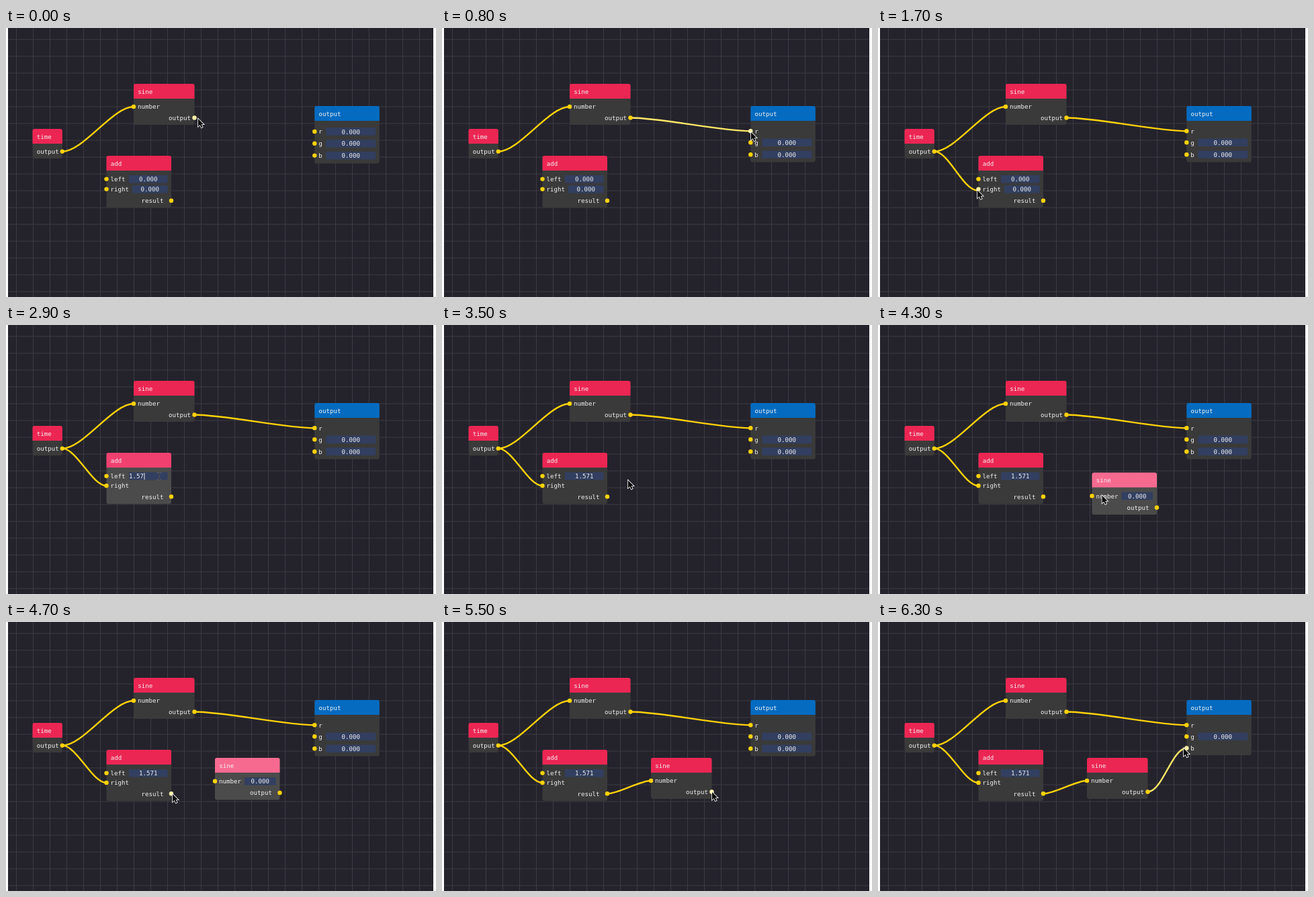
Animation, 640 px wide and 400 px high, one loop 6400 ms. Source, as an HTML page with a canvas:

```html
<!DOCTYPE html>
<html lang="en">
<head>
<meta charset="utf-8">
<title>Node editor</title>
<style>
html, body { margin: 0; width: 100%; height: 100%; overflow: hidden; background: #fff; }
canvas { display: block; width: 640px; height: 400px; }
</style>
</head>
<body>
<canvas id="stage" width="640" height="400"></canvas>
<script>
const ctx = document.getElementById('stage').getContext('2d');
const LOOP = 6400, STEP = 100;
const FONT = '9.15px "DejaVu Sans Mono", monospace';
const CHAR = 5.5, TITLE_H = 22, REACH = 8;
const RED = ['#ec2653', '#f04070', '#f76a90'];
const BLUE = ['#046bc0', '#2d7ec2', '#5194cc'];
const YELLOW = '#ffd20a';
const MENU = ['output', 'time', 'sine', 'multiply', 'add'];

// Mouse path: step, x, y
const PATH = [
  [0, 286, 135], [1, 289, 136], [6, 458, 154], [8, 460, 155], [12, 84, 186],
  [14, 128, 226], [16, 148, 241], [18, 148, 242], [22, 228, 225], [33, 228, 225],
  [37, 326, 237], [38, 326, 237], [40, 341, 271], [42, 341, 271], [44, 326, 236],
  [47, 248, 256], [48, 250, 256], [51, 310, 237], [52, 311, 238], [55, 402, 253],
  [56, 404, 251], [62, 455, 188], [64, 455, 188]
];

// Link: from node, pin, to node, pin, step grabbed, step dropped
const LINKS = [
  ['time', 'output', 'sine', 'number', -2, -1],
  ['sine', 'output', 'out', 'r', 1, 7],
  ['time', 'output', 'add', 'right', 13, 18],
  ['add', 'result', 'sine2', 'number', 48, 52],
  ['sine2', 'output', 'out', 'b', 56, 63]
];

function mouseAt(n) {
  let i = 0;
  while (i < PATH.length - 2 && PATH[i + 1][0] <= n) i++;
  const [a, ax, ay] = PATH[i], [b, bx, by] = PATH[i + 1];
  const u = (n - a) / (b - a), e = u * u * (3 - 2 * u);
  return { x: ax + (bx - ax) * e, y: ay + (by - ay) * e };
}

const input = (name, y, field, value = '0.000') => ({ name, y, x: 6, field, value });
const output = (name, y, x) => ({ name, y, x, out: true });

function sineNode(x, y, linked) {
  return {
    x, y, title: 'sine', colors: RED, w: linked ? 90.5 : 96.5, h: linked ? 61 : 62.5,
    rows: [input('number', linked ? 34 : 34.8, !linked && [44, 90.5]),
           output('output', linked ? 50.5 : 52, 52)]
  };
}

function buildNodes(n) {
  const r = n >= 7, b = n >= 63, right = n >= 18;
  const nodes = {
    time: { x: 39.5, y: 150, w: 44.3, h: 44, title: 'time', colors: RED, rows: [output('output', 33.6, 6.3)] },
    sine: sineNode(190, 83, true),
    add: {
      x: 149.5, y: 190, w: 96.5, h: right ? 76 : 77.3, title: 'add', colors: RED,
      rows: [input('left', 34.6, [33.5, 91], n >= 33 ? '1.571' : '0.000'),
             input('right', right ? 49 : 49.6, !right && [38.5, 91]),
             output('result', right ? 65.3 : 66.8, 52)]
    },
    out: {
      x: 459.3, y: 116, w: 96.5, h: 85.5 - (r ? 2 : 0) - (b ? 1.5 : 0), title: 'output', colors: BLUE,
      rows: [input('r', r ? 37.2 : 38, !r && [17, 91]),
             input('g', r ? 54.2 : 55.8, [17, 91]),
             input('b', r ? (b ? 71.5 : 72.2) : 73.6, !b && [17, 91])]
    }
  };
  if (n >= 42) {
    const m = mouseAt(Math.min(n, 44));
    nodes.sine2 = sineNode(m.x - 15, m.y - 34, n >= 52);
    nodes.sine2.selected = n < 48;
  }
  for (const node of Object.values(nodes))
    for (const row of node.rows)
      row.pin = { x: node.x + (row.out ? node.w : 0), y: node.y + row.y };
  return nodes;
}

const dist = (a, b) => Math.hypot(a.x - b.x, a.y - b.y);
const pinOf = (nodes, id, name) => nodes[id].rows.find(row => row.name === name).pin;

function curve(a, b) {
  const k = dist(a, b) / 4;
  return [a.x, a.y, a.x + k, a.y, b.x - k, b.y, b.x, b.y];
}

function nearCurve(c, m) {
  for (let t = 0; t <= 1; t += 0.02) {
    const s = 1 - t, w = [s * s * s, 3 * s * s * t, 3 * s * t * t, t * t * t];
    const p = { x: 0, y: 0 };
    w.forEach((v, i) => { p.x += v * c[2 * i]; p.y += v * c[2 * i + 1]; });
    if (dist(p, m) < REACH) return true;
  }
  return false;
}

function rect(x, y, w, h, color, radius = 0) {
  ctx.fillStyle = color;
  ctx.beginPath();
  ctx.roundRect(x, y, w, h, radius);
  ctx.fill();
}

function text(str, x, y) {
  ctx.fillStyle = '#f2f2f2';
  ctx.fillText(str, x, y + 3);
}

function drawGrid() {
  rect(0, 0, 640, 400, '#fff');
  rect(3, 0, 633, 400, '#24232c');
  for (let x = 15; x < 636; x += 25) rect(x, 0, 1, 400, '#3c3b43');
  for (let y = 17; y < 400; y += 25) rect(3, y - 0.5, 633, 1, '#3c3b43');
}

function drawLink(c, color) {
  ctx.strokeStyle = color;
  ctx.lineWidth = 2.4;
  ctx.beginPath();
  ctx.moveTo(c[0], c[1]);
  ctx.bezierCurveTo(...c.slice(2));
  ctx.stroke();
}

function drawEdit(n, x, y) {
  const typed = n < 26 ? '0.000' : '1.571'.slice(0, n >= 31 ? 5 : Math.min(n - 25, 4));
  if (n < 26) rect(x, y - 5.5, 5 * CHAR, 11, '#3a6ea8');
  text(typed, x, y);
  rect(x + typed.length * CHAR + 0.5, y - 5, 1, 10, '#e8e8e8');
}

function drawNode(node, n, hovered, hotPin) {
  const { x, y, w, h } = node;
  const lit = node.selected || hovered;
  rect(x, y, w, h, lit ? '#4b4b4b' : '#3a3a3a', 3);
  rect(x, y, w, TITLE_H, node.colors[node.selected ? 2 : hovered ? 1 : 0], [3, 3, 0, 0]);
  text(node.title, x + 6.3, y + 11.5);
  for (const row of node.rows) {
    const cy = y + row.y;
    text(row.name, x + row.x, cy + 0.3);
    if (row.field) {
      const [a, b] = row.field;
      rect(x + a, cy - 5.7, b - a, 11.5, '#323f60');
      if (row.name === 'left' && n >= 24 && n < 33) drawEdit(n, x + a, cy + 0.5);
      else text(row.value, x + (a + b - row.value.length * CHAR) / 2, cy + 0.5);
    }
    ctx.fillStyle = row.pin === hotPin ? '#fff2a6' : YELLOW;
    ctx.beginPath();
    ctx.arc(row.pin.x, row.pin.y, 3.2, 0, Math.PI * 2);
    ctx.fill();
  }
}

function drawMenu(m) {
  rect(326, 237, 73, 75, '#45454c');
  rect(327, 238, 71, 73, '#141414');
  MENU.forEach((name, i) => {
    const y = 248.7 + i * 13.2;
    if (m.x > 328 && Math.abs(m.y - y) < 6.6) rect(329, y - 6.7, 67, 13.2, '#387ccd');
    text(name, 332, y + 0.3);
  });
}

function drawArrow(m) {
  const shape = [[0, 0], [0, 11.5], [2.7, 9], [4.7, 13.2], [6.6, 12.3], [4.7, 8.2], [8.2, 8.2]];
  ctx.beginPath();
  for (const [x, y] of shape) ctx.lineTo(m.x + x, m.y + y);
  ctx.closePath();
  ctx.lineWidth = 1.6;
  ctx.strokeStyle = '#fff';
  ctx.stroke();
  ctx.fillStyle = '#080808';
  ctx.fill();
}

function drawBeam(m) {
  const bars = [[-2, -5.5, 1.7, 1], [0.3, -5.5, 1.7, 1], [-0.5, -5, 1, 10], [-2, 4.5, 1.7, 1], [0.3, 4.5, 1.7, 1]];
  for (const [x, y, w, h] of bars) rect(m.x + x - 0.4, m.y + y - 0.4, w + 0.8, h + 0.8, '#8a93a8');
  for (const [x, y, w, h] of bars) rect(m.x + x, m.y + y, w, h, '#080808');
}

function draw(n) {
  const m = mouseAt(n), nodes = buildNodes(n), list = Object.values(nodes);
  const menu = n >= 38 && n < 42;
  let hotPin, hotNode, hotLink;
  if (!menu) {
    hotPin = list.flatMap(node => node.rows.map(row => row.pin)).find(pin => dist(pin, m) < REACH);
    if (!hotPin) hotNode = list.find(d => m.x > d.x && m.x < d.x + d.w && m.y > d.y && m.y < d.y + d.h);
  }

  const links = [];
  let dragged;
  for (const [from, a, to, b, grab, drop] of LINKS) {
    if (n < grab) continue;
    const start = pinOf(nodes, from, a);
    if (n < drop) {
      dragged = curve(start, m);
    } else {
      const end = pinOf(nodes, to, b);
      links.push({ start, end, c: curve(start, end) });
    }
  }
  if (!menu && !hotNode)
    hotLink = links.find(l => hotPin ? l.start === hotPin || l.end === hotPin : nearCurve(l.c, m));

  ctx.font = FONT;
  drawGrid();
  for (const l of links) drawLink(l.c, l === hotLink ? '#ffe866' : YELLOW);
  if (dragged) drawLink(dragged, YELLOW);
  for (const node of list) drawNode(node, n, node === hotNode, hotPin);
  if (menu) drawMenu(m);

  const field = m.x > 183 && m.x < 241 && Math.abs(m.y - 224.6) < 6;
  if (field) drawBeam(m);
  else drawArrow(m);
}

const t0 = performance.now();
function tick() {
  const t = (performance.now() - t0) % LOOP;
  draw(Math.floor(t / STEP));
  requestAnimationFrame(tick);
}
tick();
</script>
</body>
</html>
```
